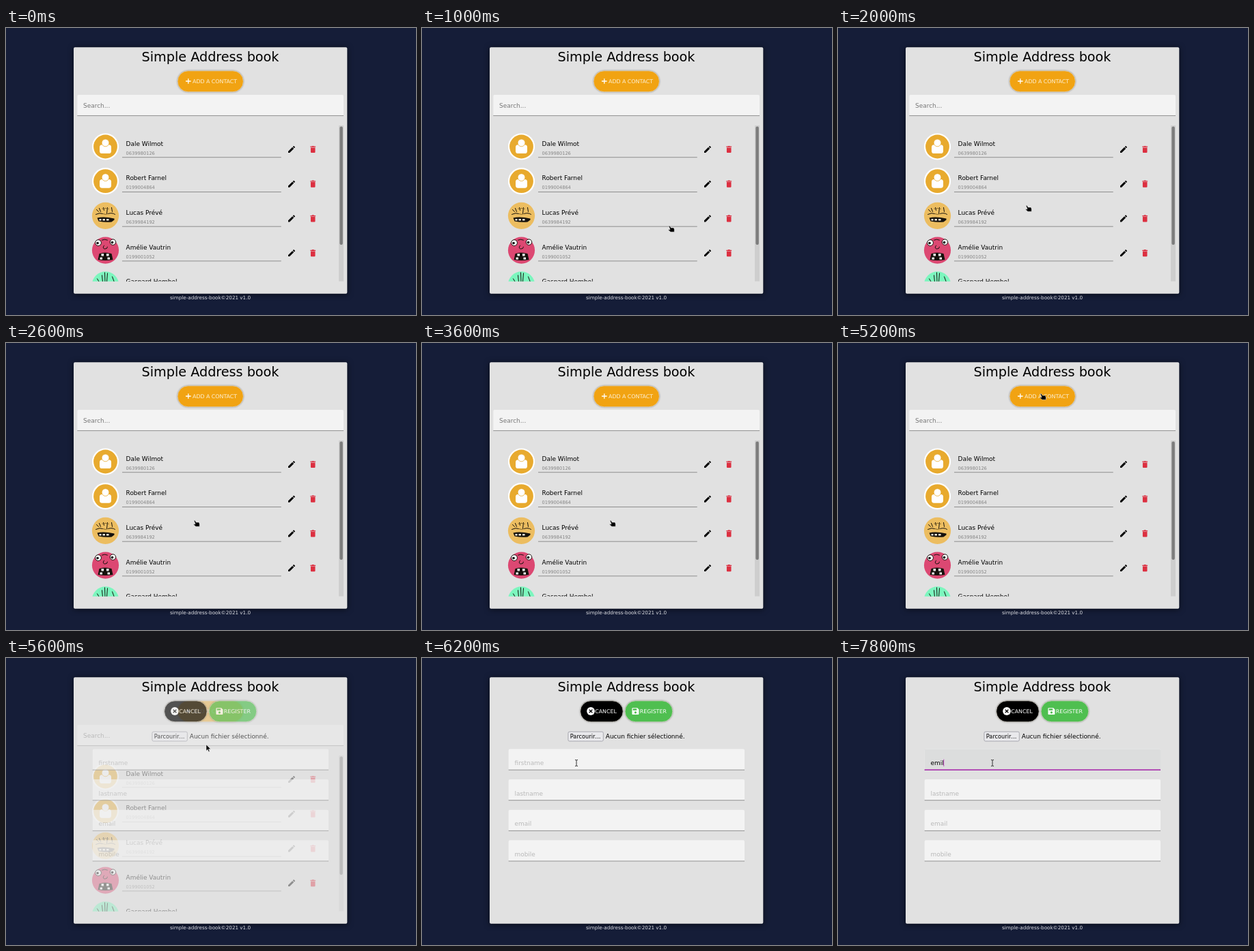
Animation, 600 px wide and 421 px high, one loop 8 s. Source, as an HTML page:

```html
<!DOCTYPE html>
<html lang="en">
<head>
<meta charset="utf-8">
<title>Simple Address book</title>
<style>
  html, body { margin: 0; width: 100%; height: 100%; overflow: hidden; background: #151d38; }
  svg { display: block; width: 100vw; height: 100vh; }
  text { font-family: "DejaVu Sans", sans-serif; font-size: 8.95px; white-space: pre; }
  .card { fill: #e1e1e1; filter: drop-shadow(0 1px 4px rgba(0, 0, 0, .6)); }
  .mid { text-anchor: middle; }
  .btn { font-size: 7.87px; fill: #fff; }
  .pill { stroke: #d8d3c9; stroke-width: .8; filter: drop-shadow(0 .6px .8px rgba(0, 0, 0, .35)); }
  .fill { fill: #f3f3f3; }
  .rule { fill: #858585; }
  .hint { fill: #b9b9b9; }
  .ink { fill: none; stroke: #15110c; stroke-width: 1; stroke-linecap: round; }
  .arrow, .hand { stroke: #fff; stroke-width: .5; }
</style>
</head>
<body>
<svg viewBox="0 0 600 421" preserveAspectRatio="none">
  <defs>
    <clipPath id="listClip"><rect x="104" y="143" width="383" height="228.7"/></clipPath>
    <g id="pencil"><path d="M-5 2.9V5h2.1L3.2-1.1 1.1-3.2ZM4.8-2.7a.6.6 0 0 0 0-.8L3.5-4.8a.6.6 0 0 0-.8 0L1.7-3.8 3.8-1.7Z"/></g>
    <g id="bin" fill="#dc2f40"><path d="M-3.3 4.1a1 1 0 0 0 1 1h4.6a1 1 0 0 0 1-1V-2.6h-6.6ZM-3.9-4.4h2.1l.6-.7h2.4l.6.7h2.1v1.2h-7.8Z"/></g>
    <g id="person">
      <circle r="19.6" fill="#fff"/><circle r="17.4" fill="#e8aa2e"/>
      <rect x="-8.5" y="-2.8" width="17" height="12.8" rx="3.6" fill="#fff"/>
      <circle cy="-5.6" r="5.4" fill="#fff" stroke="#e8aa2e" stroke-width=".8"/>
    </g>
    <g id="sandy">
      <circle r="19.6" fill="#ecbd60"/>
      <path class="ink" stroke-width=".8" d="M-13-9l3 3m1-5 2 5M3-12l-1 9m7-9 1 6M-3-12l1 4m-12 6q6-3 10-1M4-3q6-2 10 1"/>
      <path fill="none" stroke="#806226" d="M-5-10q5-2 10 0M-4-3l4 1 4-1"/>
      <path d="M-12 3q10-2 25 1v2L9 9q-9 1-19-1Z" fill="#15110c"/>
      <path d="M-9 4.5h3v2.6h-3Zm5 0h3.4v2.6H-4Zm5.5 0H5v2.6H1.5Z" fill="#f7efdc"/>
    </g>
    <g id="rose">
      <circle r="19.6" fill="#dc4872"/>
      <circle cx="-10.5" cy="-11" r="4.4" fill="#fff" stroke="#15110c"/>
      <circle cx="11" cy="-12" r="4.2" fill="#fff" stroke="#15110c"/>
      <circle cx="-11.5" cy="-10.5" r="1.8"/><circle cx="10" cy="-11.5" r="1.8"/>
      <path class="ink" d="M-2-7q-3 4 1 5 4 0 4-3M-5-15q4-2 8 0"/>
      <path d="M-9 5q8-3 18 0l2 9q-11 2-22 0Z" fill="#15110c"/>
      <path d="M-6 5h3.5v3.4H-6Zm7.5 0H5v3.4H1.5ZM-8 10.5h3.5v3H-8Zm11 0h3.5v3H3Z" fill="#fff"/>
    </g>
    <g id="mint">
      <circle r="19.6" fill="#7cf6be"/>
      <path class="ink" d="M-5-14l1 10M-1-18l.5 14M3-17 2-4M-12-9l3 5M10-12l3 8"/>
    </g>
  </defs>

  <rect width="600" height="421" fill="#151d38"/>
  <rect class="card" x="99" y="28.3" width="400.3" height="361.5" rx="2"/>
  <text class="mid" x="299" y="49" style="font-size:19.2px">Simple Address book</text>
  <text class="mid" x="299" y="397.8" style="font-size:7.2px" fill="#dcdde2">simple-address-book©2021 v1.0</text>

  <g id="list">
    <rect class="pill" x="251" y="62.8" width="96.4" height="31" rx="15.5" fill="#f1a312"/>
    <path d="M263 78h7.6M266.8 74.2v7.6" stroke="#fff" stroke-width="1.3"/>
    <text class="btn" x="273" y="80.9" style="fill:#fdf0d6">ADD A CONTACT</text>
    <rect class="fill" x="104.3" y="98" width="389.7" height="31" rx="2"/>
    <rect class="rule" x="104.3" y="128.2" width="389.7" height=".9"/>
    <text x="113" y="117.2" fill="#777">Search...</text>
    <rect x="487" y="143" width="7" height="228.5" fill="#cecece"/>
    <rect x="488.4" y="144.5" width="4.4" height="173.5" rx="2.1" fill="#7c7c7c"/>
    <g id="rows" clip-path="url(#listClip)"></g>
  </g>

  <g id="form" opacity="0">
    <rect class="pill" x="231.6" y="62.8" width="62.6" height="31" rx="15.5"/>
    <circle cx="247" cy="78" r="5.9" fill="#fff"/>
    <path d="M244.7 75.7l4.6 4.6m0-4.6-4.6 4.6" stroke="#000" stroke-width="1.3"/>
    <text class="btn" x="253.2" y="80.9">CANCEL</text>
    <rect class="pill" x="297" y="62.8" width="69.8" height="31" rx="15.5" fill="#4fbf50"/>
    <path d="M307.4 74.2a1 1 0 0 1 1-1h6.8l2.2 2.2v6.6a1 1 0 0 1-1 1h-8a1 1 0 0 1-1-1Z" fill="#fff"/>
    <path d="M308.6 74.3h5.6v2.5h-5.6Z" fill="#4fbf50"/><circle cx="312.4" cy="79.9" r="1.6" fill="#4fbf50"/>
    <text class="btn" x="318.8" y="80.9">REGISTER</text>
    <rect x="213.9" y="108.2" width="51.4" height="13.8" rx="2" fill="#e9e9ec" stroke="#8f8f9a" stroke-width=".7"/>
    <text x="216.8" y="118.1" style="font-size:8.2px">Parcourir…</text>
    <text x="268.8" y="118.1">Aucun fichier sélectionné.</text>
    <g id="fields"></g>
    <g id="focus" opacity="0">
      <rect x="126.7" y="133.5" width="345.3" height="31" rx="2" fill="#dcdddd"/>
      <rect x="126.7" y="163.4" width="345.3" height="1.4" fill="#a417a8"/>
      <text id="ghost" class="hint" x="135.5" y="157">firstname</text>
      <text id="typed" x="135.5" y="157"></text>
      <rect id="caret" x="135.3" y="148.6" width=".8" height="10.4" fill="#b51cb8"/>
    </g>
  </g>

  <g id="pointer">
    <path id="arrow" class="arrow" d="M0 0v9.2l2.1-1.9 1.5 3.3 1.5-.7-1.5-3.2h2.9Z"/>
    <path id="hand" class="hand" d="M-4-4.2q.7-1 1.6-.2L-.6-1.9 2.6-2Q4.2-1.5 4.3.4V4.2H-1.2L-4.3 1.4q-.2-1.1 1-1L-2.1 1-2.4-.9Z"/>
    <path id="beam" d="M-2-4.6q1.6 0 2 .7.4-.7 2-.7M0-4V4M-2 4.6q1.6 0 2-.7.4.7 2 .7" fill="none" stroke="#333" stroke-width="1"/>
  </g>
</svg>

<script>
const LOOP = 8000;
const FRAME = 200;
const $ = id => document.getElementById(id);

const contacts = [
  ['Dale Wilmot', '0639980126', 'person'],
  ['Robert Farnel', '0199004864', 'person'],
  ['Lucas Prévé', '0639984192', 'sandy'],
  ['Amélie Vautrin', '0199001052', 'rose'],
  ['Gaspard Hembol', '0639987310', 'mint'],
];

$('rows').innerHTML = contacts.map(([name, phone, face], i) => `
  <g transform="translate(0 ${i * 50.7})">
    <use href="#${face}" x="145.5" y="174"/>
    <text x="175.6" y="172.5">${name}</text>
    <text x="175.6" y="185.8" fill="#858585" style="font-size:6.65px">${phone}</text>
    <rect class="rule" x="170" y="189.3" width="232.7" height=".9"/>
    <use href="#pencil" x="418" y="178"/>
    <use href="#bin" x="449.2" y="178"/>
  </g>`).join('');

$('fields').innerHTML = ['firstname', 'lastname', 'email', 'mobile'].map((hint, i) => `
  <g transform="translate(0 ${i * 44.6})">
    <rect class="fill" x="126.7" y="133.5" width="345.3" height="31" rx="2"/>
    <rect class="rule" x="126.7" y="163.7" width="345.3" height=".9"/>
    <text class="hint" x="135.5" y="157">${hint}</text>
  </g>`).join('');

// Holds each value until the next step's time.
function play(el, prop, steps) {
  const frames = [...steps, [LOOP, steps.at(-1)[1]]]
    .map(([time, value]) => ({ offset: time / LOOP, [prop]: value, easing: 'step-end' }));
  el.animate(frames, { duration: LOOP, iterations: Infinity });
}

// Cross-fade between the list and the form
const fade = [[0, 0]];
for (let t = 5400; t <= 5800; t += FRAME) fade.push([t, Math.min(1, (t - 5250) / 550)]);
play($('form'), 'opacity', fade);
play($('list'), 'opacity', fade.map(([t, v]) => [t, 1 - v]));

// Pointer: time, x, y, shape
const path = [
  [0, 620, 440, 'arrow'],
  [400, 590, 410, 'arrow'],
  [600, 528, 366, 'arrow'],
  [800, 446, 327, 'arrow'],
  [1000, 365, 295, 'hand'],
  [1200, 304, 273, 'hand'],
  [1400, 279, 265, 'hand'],
  [4000, 300, 222, 'hand'],
  [4200, 338, 152, 'hand'],
  [4400, 359, 104, 'beam'],
  [4600, 329, 85, 'hand'],
  [4800, 306, 80, 'hand'],
  [5000, 300, 79, 'hand'],
  [5400, 298, 92, 'arrow'],
  [5600, 293, 127, 'arrow'],
  [5800, 258, 146, 'beam'],
  [6000, 232, 153, 'beam'],
  [6200, 226, 154, 'beam'],
];
play($('pointer'), 'transform', path.map(([t, x, y]) => [t, `translate(${x}px, ${y}px)`]));
for (const shape of ['arrow', 'hand', 'beam'])
  play($(shape), 'opacity', path.map(([t, , , s]) => [t, s === shape ? 1 : 0]));

// Focus and typing
const word = 'emil';
const typeStart = 7200;
const typed = $('typed');
typed.innerHTML = [...word].map(c => `<tspan>${c}</tspan>`).join('');
const caretSteps = [[0, 'translate(0px, 0px)']];
[...typed.children].forEach((letter, i) => {
  const time = typeStart + i * FRAME;
  play(letter, 'fill', [[0, 'transparent'], [time, '#000']]);
  caretSteps.push([time, `translate(${typed.getSubStringLength(0, i + 1)}px, 0px)`]);
});
play($('caret'), 'transform', caretSteps);
play($('caret'), 'opacity', [[0, 1], [7000, 0], [typeStart, 1]]);
play($('ghost'), 'opacity', [[0, 1], [typeStart, 0]]);
play($('focus'), 'opacity', [[0, 0], [6400, 1]]);
</script>
</body>
</html>
```
